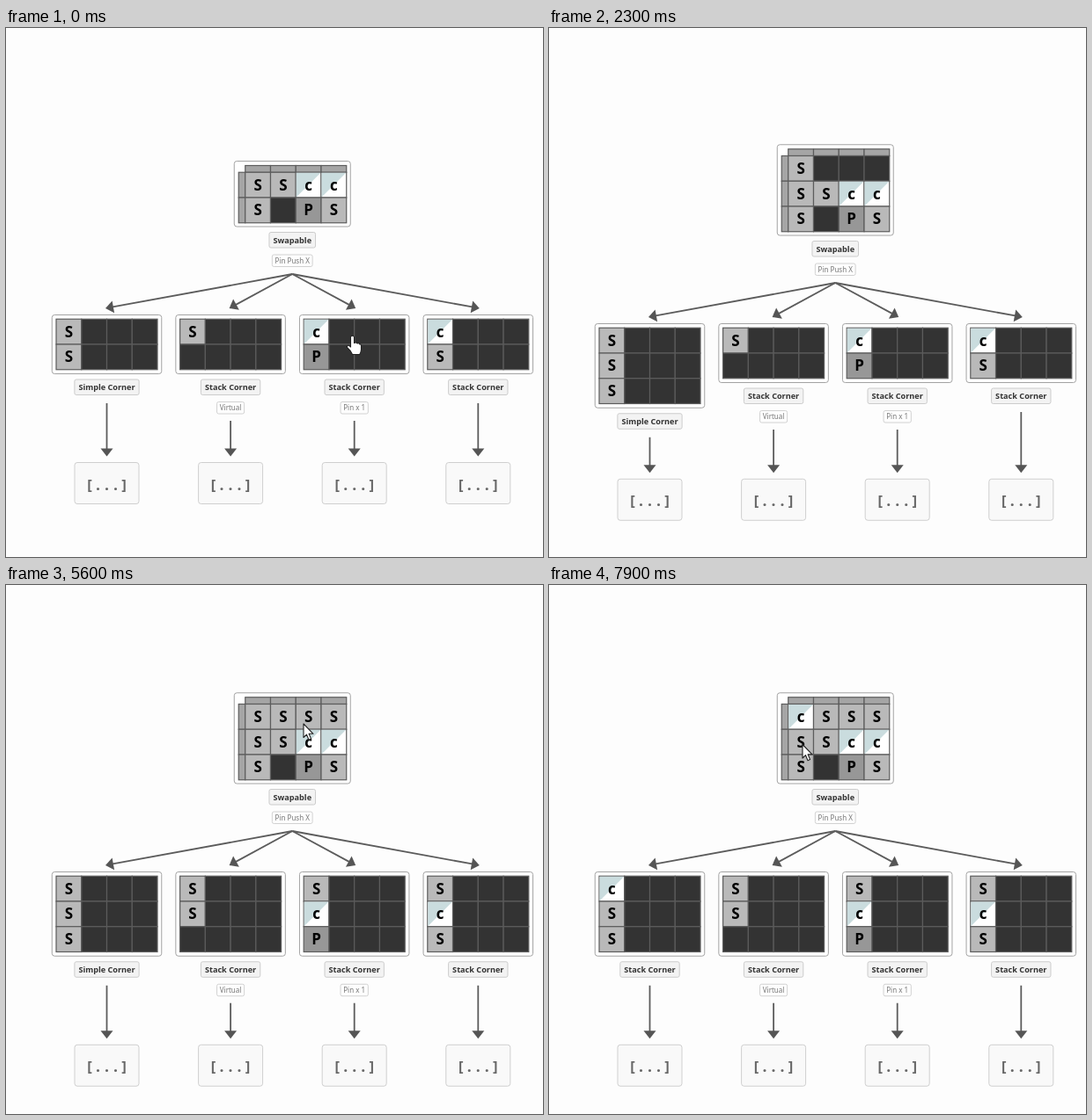
Animation, 610 px wide and 602 px high, one loop 8000 ms. Source, as an HTML page:

```html
<!DOCTYPE html>
<html lang="en">
<head>
<meta charset="utf-8">
<title>Layer tree</title>
<style>
  html, body { margin: 0; width: 100%; height: 100%; overflow: hidden; background: #fdfdfd; }
  svg { display: block; width: 610px; height: 602px; }
  text { font-family: "Noto Sans", "Open Sans", sans-serif; text-anchor: middle; }
  .panel { fill: #fff; stroke: #a3a3a3; }
  .cell { stroke: #5c5c5c; stroke-width: 1.2; }
  .glyph { font-size: 17px; font-weight: 700; fill: #000; }
  .label { font-size: 9.15px; font-weight: 700; fill: #333; }
  .label-box { fill: #f3f3f3; stroke: #ccc; }
  .tag { font-size: 8px; fill: #777; }
  .tag-box { fill: #fdfdfd; stroke: #d2d2d2; }
  .more { font: 700 16.7px "Noto Sans Mono", "DejaVu Sans Mono", monospace; fill: #666; white-space: pre; }
  .more-box { fill: #f9f9f9; stroke: #cfcfcf; }
  .line { stroke: #5c5c5c; stroke-width: 1.8; }
  .head { fill: #555; }
  .item { font-size: 11px; fill: #333; }
  .cursor { fill: #fff; stroke: #222; stroke-width: 1.1; stroke-linejoin: round; }
</style>
</head>
<body>
<svg id="stage" viewBox="0 0 610 602"></svg>
<script>
const LOOP = 8000, STEP = 100, CELL = 28.75, MID_X = 325.25, MID_Y = 346.75;
const stage = document.getElementById('stage');
const pen = document.createElement('canvas').getContext('2d');

// Each column reads from top to bottom; a dot is an empty cell.
const layers = [
  [0, ['SS', 'S.', 'cP', 'cS']],
  [2300, ['SSS', 'S.', 'cP', 'cS']],
  [3000, ['SSS', 'SS.', 'cP', 'cS']],
  [3600, ['SSS', 'SS.', 'ScP', 'ScS']],
  [7100, ['cSS', 'SS.', 'ScP', 'ScS']]
];
const tags = ['', 'Virtual', 'Pin x 1', ''];

// time, cursor shape, x, y
const moves = [
  [0, 'point', 393.5, 350], [100, 'grab', 364, 310], [200, 'grab', 290, 287],
  [300, 'grab', 195, 258], [400, 'grab', 100, 229], [500, 'grab', 18, 204], [600, ''],
  [4600, 'grab', 146, 119], [4700, 'grab', 178, 126], [4800, 'grab', 215, 136],
  [4900, 'grab', 248, 145], [5000, 'arrow', 278, 152], [5100, 'arrow', 302, 156],
  [5200, 'arrow', 321, 158], [5300, 'arrow', 333, 159], [5400, 'arrow', 338, 159],
  [5500, 'arrow', 338, 158], [5800, 'arrow', 338, 153], [5900, 'arrow', 338, 148],
  [6200, 'arrow', 320, 148], [6300, 'arrow', 297, 148], [6400, 'arrow', 283, 149],
  [6600, 'arrow', 290, 156], [6700, 'arrow', 297, 170], [6800, 'arrow', 304, 187],
  [6900, 'arrow', 309, 200], [7000, 'arrow', 310, 203], [7100, 'arrow', 308, 202],
  [7200, 'arrow', 299, 193], [7300, 'arrow', 291, 185], [7400, 'arrow', 289, 183],
  [7800, 'arrow', 288.5, 182], [7900, 'arrow', 288, 181.5]
];
const shapes = {
  arrow: 'M0 0V15.5L3.5 12.2L6 18.2L8.6 17.1L6.1 11.3H11Z',
  point: 'M-2 1.5Q0-1 2 1.5V8.5Q4 7 5.5 9Q7.5 8 8.3 10Q10 9.5 10 12V16Q9.8 19 8.2 21.5H0Q-2 17-6 13.5Q-6.5 10.5-3.5 11.5L-2 13Z',
  grab: 'M-5 2V-7Q-3.5-9.5-2-7V-9.5Q-.5-12 1-9.5V-8.5Q2.5-10.5 4-8V-6Q5.5-8 7-5.5V4Q6.5 8 5 11H-4Q-6 6-9 2.5Q-8.5-.5-5 2ZM-2-7V0M1-9V0M4-7V0'
};
// time, opacity, highlighted row
const menus = [[0, 0, 0], [6600, 0.68, 0], [6700, 1, 0], [6800, 1, 1], [6900, 1, 2], [7100, 0.4, 2], [7200, 0, 0]];

const at = (table, t) => table.filter(row => row[0] <= t).pop();
const rect = (cls, x, y, w, h, r = 0, extra = '') =>
  `<rect class="${cls}" x="${x}" y="${y}" width="${w}" height="${h}" rx="${r}" ${extra}/>`;
const text = (cls, x, y, s) => `<text class="${cls}" x="${x}" y="${y}">${s}</text>`;

function cell(x, y, c) {
  const fill = { S: '#b9b9b9', P: '#979797', c: '#fff' }[c] || '#333';
  let out = rect('cell', x, y, CELL, CELL, 0, `fill="${fill}"`);
  if (c === 'c') out += `<path fill="#cadcde" d="M${x + .5} ${y + .5}h${CELL - 1}l${1 - CELL} ${CELL - 1}z"/>`;
  if (c !== '.') out += text('glyph', x + CELL / 2, y + CELL / 2 + 6, c);
  return out;
}

function grid(x, y, rows) {
  return rows.map((row, j) =>
    [...row].map((c, i) => cell(x + i * CELL, y + j * CELL, c)).join('')).join('');
}

function chip(kind, x, y, h, s) {
  pen.font = kind === 'label' ? '700 9.15px "Noto Sans", "Open Sans", sans-serif'
                              : '8px "Noto Sans", "Open Sans", sans-serif';
  const w = pen.measureText(s).width + (kind === 'label' ? 9 : 6.5);
  return rect(kind + '-box', x - w / 2, y, w, h, 2) + text(kind, x, y + h / 2 + (kind === 'label' ? 3.4 : 3), s);
}

function caption(x, bottom, name, tag) {
  return chip('label', x, bottom + 6.5, 17.5, name) + (tag ? chip('tag', x, bottom + 32, 13.5, tag) : '');
}

function arrow(x1, y1, x2, y2) {
  const turn = Math.atan2(y2 - y1, x2 - x1), deg = turn * 180 / Math.PI;
  return `<line class="line" x1="${x1}" y1="${y1}" x2="${x2 - 7 * Math.cos(turn)}" y2="${y2 - 7 * Math.sin(turn)}"/>` +
    `<path class="head" transform="translate(${x2} ${y2}) rotate(${deg})" d="M0 0L-9-7V7Z"/>`;
}

function mainPanel(top, columns, count) {
  const left = MID_X - 66, gx = left + 12.5, gy = top + 12.75;
  const rows = Array.from({ length: count }, (_, j) =>
    columns.map(col => col.padStart(count, '.')[j]).join(''));
  let out = rect('panel', left, top, 132, 17 + CELL * count, 3);
  for (let i = 0; i < 4; i++) out += rect('cell', gx + i * CELL, gy - 7.75, CELL, 7.75, 0, 'fill="#a5a5a5"');
  for (let j = 0; j < count; j++) out += rect('cell', gx - 7.5, gy + j * CELL, 7.5, CELL, 0, 'fill="#a5a5a5"');
  return out + grid(gx, gy, rows);
}

function tree(columns) {
  const count = Math.max(...columns.map(c => c.length));
  const mainH = 17 + CELL * count;
  const heights = columns.map(c => 9.5 + CELL * c.length);
  const level = Math.max(...heights.map((h, i) => h + (tags[i] ? 46 : 26)));
  const top = MID_Y - (mainH + 100.5 + level + 54.5 + 48) / 2;
  const mainEnd = top + mainH, childTop = mainEnd + 100.5, boxTop = childTop + level + 54.5;

  let out = mainPanel(top, columns, count) + caption(MID_X, mainEnd, 'Swapable', 'Pin Push X');
  columns.forEach((col, i) => {
    const x = 114.5 + 140.6 * i, end = childTop + heights[i];
    out += arrow(MID_X, mainEnd + 54, x + (i < 2 ? -1.5 : 1.5), childTop - 7.5);
    out += rect('panel', x - 62.25, childTop, 124.5, heights[i], 3);
    out += grid(x - 57.5, childTop + 4.75, [...col].map(c => c + '...'));
    out += caption(x, end, /[cP]/.test(col) || col.includes('.') ? 'Stack Corner' : 'Simple Corner', tags[i]);
    out += arrow(x, end + (tags[i] ? 53.5 : 33.5), x, boxTop - 6.5);
    out += rect('more-box', x - 36.5, boxTop + .5, 73, 47, 3) + text('more', x, boxTop + 31.5, '[...]');
  });
  return out;
}

function menu(opacity, active) {
  if (!opacity) return '';
  const rows = ['-', 'S', 'c', 'P'].map((s, i) =>
    (i === active ? rect('', 284.5, 152.5 + i * 21, 61, 21, 0, 'fill="#8cc5f2"') : '') +
    text('item', 318.5, 167.5 + i * 21, s)).join('');
  return `<g opacity="${opacity}">` +
    rect('', 284, 152, 65, 90, 0, 'fill="#000" opacity=".18"') +
    rect('', 282.5, 150.5, 64.5, 89, 0, 'fill="#f2f2f2" stroke="#ccc"') + rows + '</g>';
}

function cursor([, kind, x, y]) {
  return kind ? `<path class="cursor" transform="translate(${x} ${y})" d="${shapes[kind]}"/>` : '';
}

let last = -1;
function draw(now) {
  const t = Math.floor((now % LOOP) / STEP) * STEP;
  if (t !== last) {
    last = t;
    const [, opacity, active] = at(menus, t);
    stage.innerHTML = tree(at(layers, t)[1]) + menu(opacity, active) + cursor(at(moves, t));
  }
}

const start = performance.now();
function tick() {
  draw(performance.now() - start);
  requestAnimationFrame(tick);
}
tick();
</script>
</body>
</html>
```
